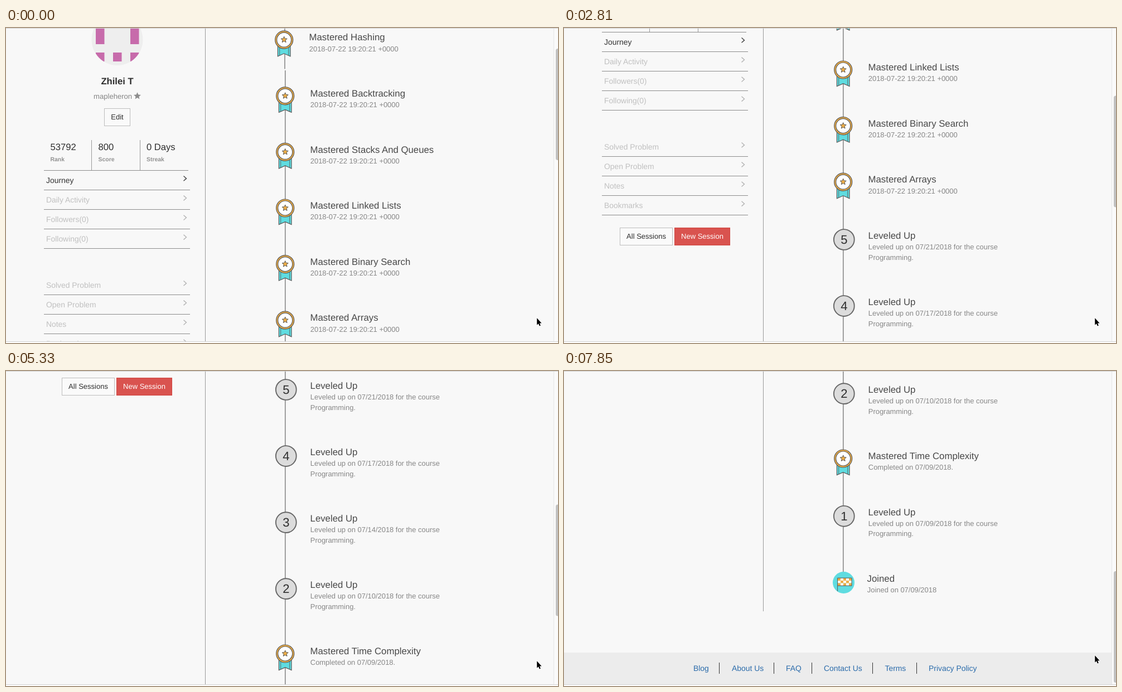
Write an HTML page that moves like this. It is 990x565 px and loops after 8 s.

```html
<!DOCTYPE html>
<html lang="en">
<head>
<meta charset="utf-8">
<style>
  html, body { margin: 0; width: 100%; height: 100%; overflow: hidden; background: #fff; }
  svg { display: block; font-family: "Liberation Sans", Arial, sans-serif; text-rendering: geometricPrecision; }
</style>
</head>
<body>
<svg id="stage" width="990" height="565" viewBox="0 0 990 565"></svg>
<script>
const LOOP = 8000, TICK = 148.1, THUMB_RATIO = 0.341;
const TEAL = '#5fdce0', GOLD = '#efae45', INK = '#585858';

const text = (x, y, size, fill, str, extra = '') =>
  `<text x="${x}" y="${y}" font-size="${size}" fill="${fill}" ${extra}>${str}</text>`;
const rect = (x, y, w, h, fill, extra = '') =>
  `<rect x="${x}" y="${y}" width="${w}" height="${h}" fill="${fill}" ${extra}/>`;
const circle = (x, y, r, fill, extra = '') =>
  `<circle cx="${x}" cy="${y}" r="${r}" fill="${fill}" ${extra}/>`;
const middle = 'text-anchor="middle"';

function star(x, y, r, attrs) {
  const points = Array.from({ length: 10 }, (_, i) => {
    const a = (i / 5 - 0.5) * Math.PI, d = i % 2 ? r * 0.45 : r;
    return `${(x + d * Math.cos(a)).toFixed(2)},${(y + d * Math.sin(a)).toFixed(2)}`;
  });
  return `<polygon points="${points.join(' ')}" ${attrs}/>`;
}

function button(x, y, w, label, fill, border, color) {
  return rect(x + 0.5, y + 0.5, w - 1, 31, fill, `stroke="${border}"`) +
    text(x + w / 2, y + 20.4, 13, color, label, middle);
}

function menu(top, labels) {
  return labels.map((label, i) => {
    const y = top + i * 35.1, active = label === 'Journey';
    return text(72, y + 22.8, 13.9, active ? '#333' : '#c0c0c0', label) +
      `<path d="M318.5 ${y + 10.5}l5 4.4-5 4.4" fill="none" stroke="${active ? '#444' : '#b5b5b5'}" stroke-width="1.4"/>` +
      rect(68, Math.round(y + 35), 262, 1, '#8c8c8c');
  }).join('');
}

function sidebar() {
  const pixel = (col, y, h) => rect(161 + col * 15.5, y, 15.5, h, '#c76bab');
  const stat = (x, value, label) => text(x, 219, 16.6, '#2e2e2e', value) +
    text(x, 239.3, 10.45, '#929292', label, 'font-weight="bold"');
  return `<clipPath id="round">${circle(199.5, 21, 46, '#000')}</clipPath>
    <g clip-path="url(#round)">${rect(150, -30, 100, 100, '#eeeeee')}
    ${pixel(0, -2, 31)}${pixel(4, -2, 31)}${[0, 2, 4].map(c => pixel(c, 44, 16)).join('')}</g>` +
    text(199.5, 100.5, 16.6, '#2e2e2e', 'Zhilei T', middle + ' font-weight="bold"') +
    text(157, 126.5, 13.1, '#868686', 'mapleheron') +
    star(235.5, 122, 6.8, 'fill="#8d8d8d"') +
    button(176, 144, 47, 'Edit', '#fafafa', '#bdbdbd', '#2e2e2e') +
    stat(79.5, '53792', 'Rank') + stat(165.5, '800', 'Score') + stat(252, '0 Days', 'Streak') +
    rect(153, 201, 1, 54, '#999') + rect(240, 201, 1, 54, '#999') + rect(68, 255, 259, 1, '#8c8c8c') +
    menu(255, ['Journey', 'Daily Activity', 'Followers(0)', 'Following(0)']) +
    menu(443, ['Solved Problem', 'Open Problem', 'Notes', 'Bookmarks']) +
    button(100, 606, 95, 'All Sessions', '#fafafa', '#bdbdbd', '#2e2e2e') +
    button(198, 606, 100, 'New Session', '#d9534f', '#cf4540', '#fff') +
    rect(357, -10, 1, 1385, '#999');
}

function medal(x, y) {
  return `<g transform="translate(${x} ${y})" stroke="${INK}" stroke-width="1.2">
    <path d="M-11.3 9V29.6L0 24.6 11.3 29.6V9Z" fill="${TEAL}"/>
    <path d="M-8 13V28M8 13V28" fill="none" stroke-width="0.9"/>
    ${circle(0, 0, 16, GOLD)}${circle(0, 0, 13, '#fff')}
    ${star(0, -0.2, 5.8, `fill="${GOLD}" stroke-width="1"`)}</g>`;
}

function level(y, n) {
  return circle(502.3, y, 18.4, '#dcdcdc', 'stroke="#666" stroke-width="1.9"') +
    text(502.3, y + 7.7, 22, '#2e2e2e', n, middle);
}

function flag(y) {
  let checks = '';
  for (let i = 0; i < 15; i++)
    checks += rect(491 + (i % 5) * 5, y - 8 + Math.floor(i / 5) * 4.5, 5, 4.5, i % 2 ? '#fff' : GOLD);
  return circle(501.5, y, 19.5, TEAL) + checks +
    `<path d="M490.6 ${y + 15.5}V${y - 8.3}H516V${y + 5.6}H491" fill="none" stroke="${INK}"/>`;
}

function timeline() {
  const mastered = (name, note = '2018-07-22 19:20:21 +0000') => ({ title: 'Mastered ' + name, notes: [note], gap: 100.6 });
  const leveled = (n, day) => ({
    title: 'Leveled Up', n, gap: 119.05,
    notes: [`Leveled up on 07/${day}/2018 for the course`, 'Programming.']
  });
  const items = [
    ...['Hashing', 'Backtracking', 'Stacks And Queues', 'Linked Lists', 'Binary Search', 'Arrays'].map(s => mastered(s)),
    leveled(5, 21), leveled(4, 17), leveled(3, 14), leveled(2, '10'),
    mastered('Time Complexity', 'Completed on 07/09/2018.'),
    leveled(1, '09'),
    { title: 'Joined', notes: ['Joined on 07/09/2018'], joined: true }
  ];
  let y = 16.3;
  let out = rect(499.2, -10, 1.6, 83.5, '#8a8a8a') + rect(500, 76, 1.6, 1230, '#8a8a8a');
  items.forEach((item, i) => {
    const shift = i === 0 || item.joined ? -2 : 0;
    out += item.joined ? flag(y + 7.8) : item.n ? level(y + 7.6, item.n) : medal(500.7 + shift, y + 4.9);
    out += text(545.6 + shift, y + 6, 16.75, '#484848', item.title);
    item.notes.forEach((note, k) => out += text(545.8 + shift, y + 25.2 + k * 18.4, 12.93, '#878787', note));
    y += item.gap;
  });
  return out;
}

function footer() {
  const links = [['Blog', 232], ['About Us', 301], ['FAQ', 398], ['Contact Us', 466], ['Terms', 575.5], ['Privacy Policy', 654]];
  return rect(0, 1449, 983, 60, '#ececec') +
    links.map(([label, x]) => text(x, 1482.4, 13.9, '#2c6cab', label)).join('') +
    [278, 376, 444, 553, 632].map(x => rect(x, 1467, 1, 20, '#333')).join('');
}

document.getElementById('stage').innerHTML = `
  ${rect(0, 0, 990, 563, '#f8f8f8')}
  <clipPath id="view">${rect(0, 1, 990, 561, '#000')}</clipPath>
  <g clip-path="url(#view)">
    <g id="page">${sidebar()}${timeline()}${footer()}</g>
    ${rect(982, 0, 8, 562, '#fafafa')}${rect(982, 0, 1, 562, '#e6e6e6')}
    ${rect(986, 37, 8, 200, '#c1c1c1', 'rx="3.5" id="thumb"')}
  </g>
  ${rect(0, 0, 990, 1, '#d2d2d2')}${rect(0, 562, 990, 1, '#d2d2d2')}
  <path id="cursor" d="M0 0V12.6L2.7 10 4.6 14.4 6.6 13.5 4.8 9.2H8.4Z" fill="#000" stroke="#fff" stroke-width="1.4" paint-order="stroke"/>`;

// Scroll distance at chosen ticks, joined by a monotone cubic curve
const KEYS = [[0, 0], [3.5, 80], [7, 117], [10, 117], [11, 119], [15, 195], [19, 248], [21, 248],
  [29, 461], [36, 594], [41, 651], [51, 944], [54, 944]];
const slope = i => (KEYS[i + 1][1] - KEYS[i][1]) / (KEYS[i + 1][0] - KEYS[i][0]);
function tangent(i) {
  if (i === 0) return slope(0);
  if (i === KEYS.length - 1) return 0;
  const a = slope(i - 1), b = slope(i);
  return a * b > 0 ? 2 * a * b / (a + b) : 0;
}
function scrollAt(tick) {
  let i = 0;
  while (i < KEYS.length - 2 && tick >= KEYS[i + 1][0]) i++;
  const [x0, y0] = KEYS[i], [x1, y1] = KEYS[i + 1];
  const w = x1 - x0, u = (tick - x0) / w, v = 1 - u;
  return y0 * v * v * (1 + 2 * u) + y1 * u * u * (3 - 2 * u) +
    w * u * v * (v * tangent(i) - u * tangent(i + 1));
}

const [page, thumb, cursor] = ['page', 'thumb', 'cursor'].map(id => document.getElementById(id));
function draw() {
  const tick = Math.floor((performance.now() % LOOP + 10) / TICK);
  const scroll = Math.round(scrollAt(tick));
  const lift = Math.min(10, Math.max(0, tick - 51) * 5);
  page.setAttribute('transform', `translate(0 ${-scroll})`);
  thumb.setAttribute('y', 37 + scroll * THUMB_RATIO);
  cursor.setAttribute('transform', `translate(952.2 ${520.2 - lift})`);
  requestAnimationFrame(draw);
}
draw();
</script>
</body>
</html>
```
